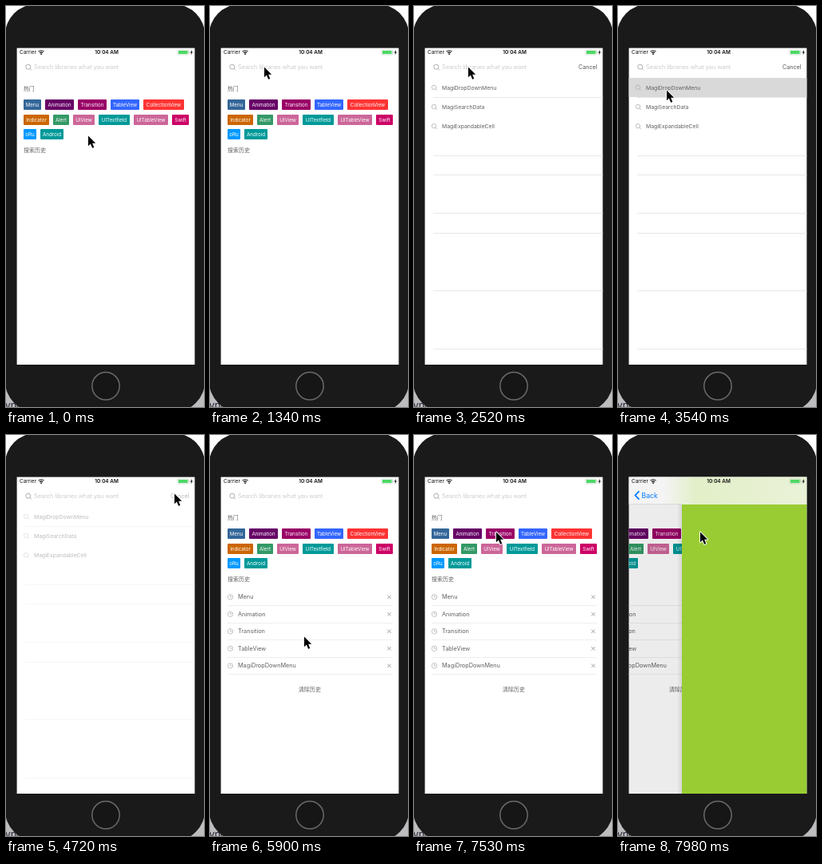
Recreate the animation shown at these times as an HTML page. Size 248x502 px, loop 8 s.

```html
<!DOCTYPE html>
<html lang="zh">
<head>
<meta charset="utf-8">
<style>
html, body { margin: 0; width: 100%; height: 100%; overflow: hidden; background: linear-gradient(#fff, #bcbcbe) }
svg { display: block; width: 248px; height: 502px }
text { font-family: Inter, "Noto Sans CJK SC", "Noto Sans CJK", sans-serif; white-space: pre }
</style>
</head>
<body>
<svg id="stage" viewBox="0 0 248 502"></svg>
<script>
const LOOP = 8000, STEP = 147.5;

const text = (s, x, y, size, fill, extra = '') =>
  `<text x="${x}" y="${y + size * .36}" font-size="${size}" fill="${fill}" ${extra}>${s}</text>`;
const rect = (x, y, w, h, fill, extra = '') =>
  `<rect x="${x}" y="${y}" width="${w}" height="${h}" fill="${fill}" ${extra}/>`;
const path = (d, stroke, width, extra = '') =>
  `<path d="${d}" fill="none" stroke="${stroke}" stroke-width="${width}" ${extra}/>`;
const lens = (x, y, r, color) =>
  path(`M${x - r} ${y}a${r} ${r} 0 1 0 ${2 * r} 0a${r} ${r} 0 1 0 ${-2 * r} 0M${x + r * .7} ${y + r * .7}l2 2`, color, .8);
const group = (id, content, extra = '') => `<g id="${id}" ${extra}>${content}</g>`;
const middle = 'text-anchor="middle"';

// Tags: label, left, right, colour
const tagRows = [
  [['Menu', 22, 44, '#369'], ['Animation', 49, 85, '#606'], ['Transition', 90, 126, '#906'],
   ['TableView', 131, 167, '#36f'], ['CollectionView', 172, 223, '#f33']],
  [['Indicator', 22, 54, '#c60'], ['Alert', 59, 79, '#396'], ['UIView', 84, 111, '#c69'],
   ['UITextfield', 116, 155, '#099'], ['UITableView', 160, 203, '#c69'], ['Swift', 208, 229, '#c06']],
  [['oRu', 22, 38, '#09f'], ['Android', 43, 72, '#099']]
];
const tags = tagRows.map((row, i) => row.map(([label, l, r, color]) => {
  const y = Math.round(117.4 + i * 18.3);
  return rect(l, y, r - l, 13, color, 'rx="1"') + text(label, (l + r) / 2, y + 6.6, 6.2, '#fff', middle);
}).join('')).join('');

const historyRow = (label, i) => {
  const y = 202.8 + i * 21.5;
  return path(`M22.3 ${y}a3.2 3.2 0 1 0 6.4 0a3.2 3.2 0 1 0 -6.4 0M25.5 ${y - 2}v2h2`, '#aaa', .7) +
    text(label, 35, y, 7.3, '#606060') +
    path(`M222.3 ${y - 2.2}l4.4 4.4m0 -4.4l-4.4 4.4`, '#888', .8) +
    rect(22, Math.floor(y + 10.7), 207, 1, '#eee');
};
const history = ['Menu', 'Animation', 'Transition', 'TableView', 'MagiDropDownMenu'].map(historyRow).join('') +
  text('清除历史', 125, 318.5, 7, '#606060', middle);

const results = [114, 187, 211, 259, 284, 356, 429].map(y => rect(24, y, 213, 1, '#e8e8e8')).join('') +
  ['MagiDropDownMenu', 'MagiSearchData', 'MagiExpandableCell'].map((label, i) =>
    lens(25, 101.8 + i * 24.2, 2.7, '#b0b0b0') + text(label, 35, 102.4 + i * 24.2, 6.84, '#606060')).join('') +
  text('Cancel', 229.5, 76.7, 7.2, '#555', 'text-anchor="end"');

const home = text('热门', 22, 104, 6.8, '#606060') + tags +
  text('搜索历史', 22, 180.9, 7, '#606060') + group('history', history);

const search = lens(27.8, 76.2, 3, '#999') + text('Search libraries what you want', 35, 76.5, 7.3, '#cbcbce') +
  rect(35, 71.5, 1.2, 10, '#4a6fe8', 'id="caret"');

const detail = rect(13, 52, 67, 397, '#000', 'opacity=".075"') + rect(74, 87, 6, 362, 'url(#shade)') +
  rect(80, 87, 157, 362, '#9c3') + rect(13, 52, 224, 35, 'url(#bar)') + rect(13, 86.5, 67, .6, '#c4c4c4') +
  path('M26.5 70.3l-5 5.2l5 5.2', '#007aff', 1.7) + text('Back', 29.5, 75.5, 8.7, '#007aff');

const status = text('Carrier', 17, 58, 6.4, '#111') +
  path('M40.6 57.2a5 5 0 0 1 7 0M42.1 58.8a3 3 0 0 1 4 0', '#111', 1.1) + '<circle cx="44.1" cy="60.2" r=".9" fill="#111"/>' +
  text('10:04 AM', 126, 58, 6.4, '#111', middle + ' font-weight="600"') +
  rect(215, 55, 13.5, 6, 'none', 'rx="1" stroke="#b4ccb8" stroke-width=".6"') +
  rect(216, 56, 11.5, 4, '#4cd964') + rect(229.3, 57, .8, 2, '#b4ccb8') +
  '<path d="M233 54.8l-2.3 3.7h1.4l-.6 2.9l2.4 -3.9h-1.4z" fill="#111"/>';

const arrow = 'M0 0V14.2L3.2 11.2L5.7 17L8.1 16L5.7 10.4H10.2Z';
const screen = [13.6, 52.6, 222.8, 396.4];

stage.innerHTML = `<defs>
  <clipPath id="screen">${rect(...screen, '#fff')}</clipPath>
  <linearGradient id="bar"><stop offset=".2" stop-color="#f4f4f4"/><stop offset=".38" stop-color="#e2efc8"/>
    <stop offset="1" stop-color="#eaf2d8"/></linearGradient>
  <linearGradient id="shade"><stop stop-color="#000" stop-opacity="0"/><stop offset="1" stop-color="#000" stop-opacity=".1"/></linearGradient>
  </defs>` +
  text('ype', -1, 499.5, 12, '#223') +
  rect(-1, -2, 250, 510, '#1a1a1b', 'rx="38"') +
  '<circle cx="125" cy="475.8" r="17.2" fill="#161617" stroke="#6a6a6a" stroke-width="1.5"/>' +
  rect(...screen, '#fff') +
  group('view', group('home', home) + rect(13, 90, 224, 24, '#d9d9d9', 'id="highlight"') +
    group('results', results) + group('search', search) + group('detail', detail) + status, 'clip-path="url(#screen)"') +
  group('cursor', path(arrow, '#fff', 2, 'stroke-linejoin="round"') + `<path d="${arrow}"/>`);

const part = id => document.getElementById(id);
const fade = (id, value) => part(id).setAttribute('opacity', value);

// Pointer stops: step, x, y
const stops = [[0, 103, 162.5], [3, 44, 180], [4, 44, 180], [9, 68, 76.5], [18, 68, 76.5], [22, 60, 107], [26, 62, 104],
  [31, 211, 73.5], [34, 211, 73.5], [38, 59, 175], [40, 118, 252.5], [42, 144, 368], [43, 144, 368],
  [49, 97, 116], [51, 103, 121.5], [55, 103, 121.5]];

function pointer(n) {
  const i = stops.findIndex(s => s[0] > n);
  const [n0, x0, y0] = stops[i - 1], [n1, x1, y1] = stops[i];
  const k = (n - n0) / (n1 - n0);
  return [x0 + (x1 - x0) * k, y0 + (y1 - y0) * k];
}

function draw(now) {
  const n = Math.floor((now % LOOP + 2) / STEP);
  const searching = n >= 12 && n < 33, pushed = n >= 54;
  const caretOn = n >= 13 && n < 32 && (n - 13) % 7 < 4;
  fade('home', searching ? 0 : 1);
  fade('history', n >= 33 ? 1 : 0);
  fade('results', !searching ? 0 : n === 12 ? .35 : n === 13 ? .75 : n === 32 ? .42 : 1);
  fade('highlight', n >= 23 && n < 26 ? 1 : 0);
  fade('caret', caretOn ? (n - 13) % 7 === 3 ? .5 : 1 : 0);
  fade('search', pushed ? 0 : 1);
  fade('detail', pushed ? 1 : 0);
  part('home').setAttribute('transform', `translate(${pushed ? -47 : 0} 0)`);
  part('cursor').setAttribute('transform', `translate(${pointer(n)}) scale(.9)`);
  requestAnimationFrame(draw);
}
requestAnimationFrame(draw);
</script>
</body>
</html>
```
